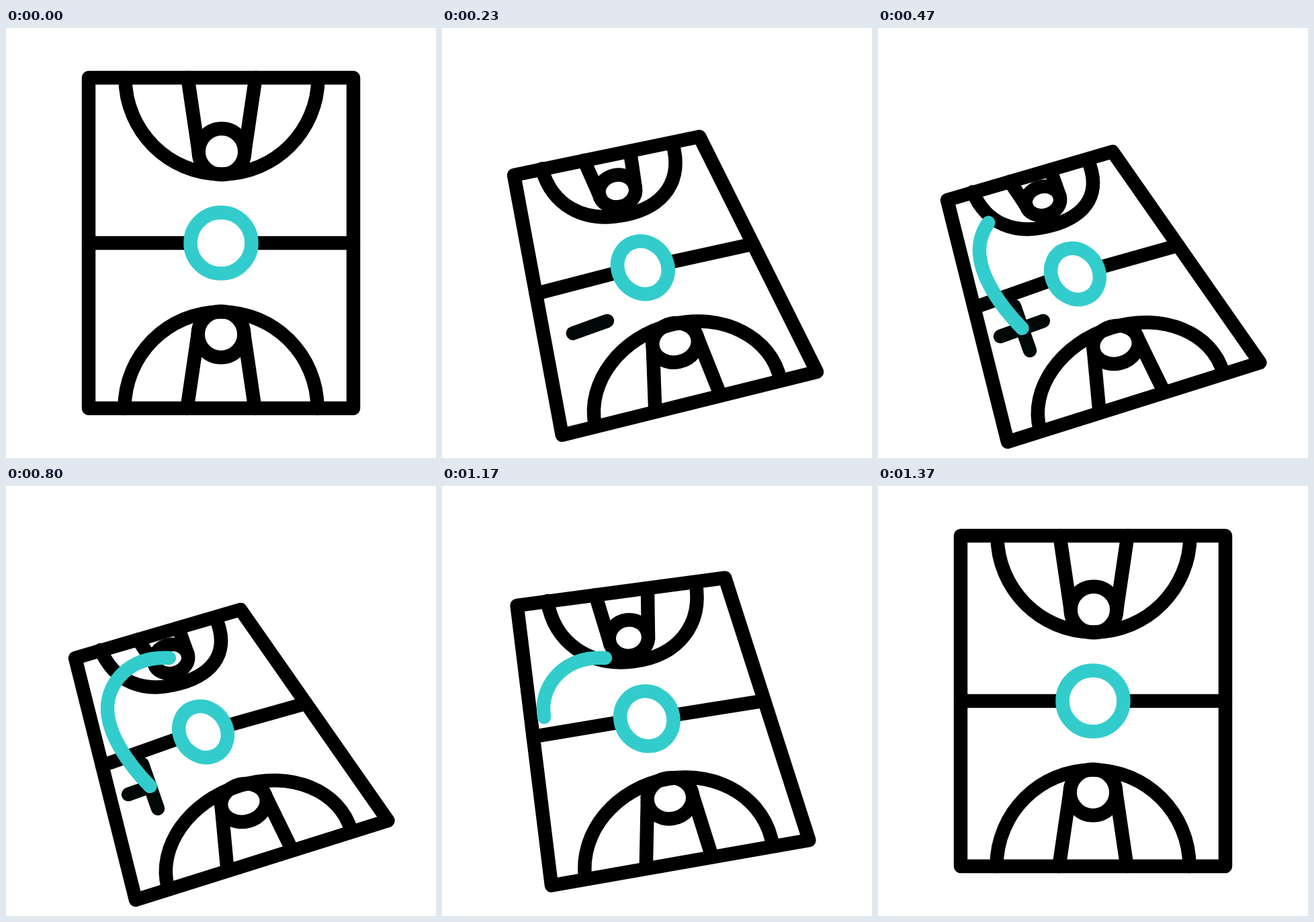
These frames come from a looping animation (640x640 px, 1670 ms). An HTML page with a canvas:

```html
<!DOCTYPE html>
<html lang="en">
<head>
<meta charset="utf-8">
<title>Court play</title>
<style>
html, body { margin: 0; width: 100%; height: 100%; overflow: hidden; background: #fff; }
canvas { display: block; width: 640px; height: 640px; }
</style>
</head>
<body>
<canvas id="stage" width="640" height="640"></canvas>
<script>
const ctx = document.getElementById('stage').getContext('2d');
const LOOP = 1670, FPS = 0.03, ROUND = 0.5523;
const BLACK = '#000', INK = '#010808', TEAL = '#33cccc';

const clamp = x => Math.min(1, Math.max(0, x));
const span = (f, from, to) => clamp((f - from) / (to - from));
const mix = (a, b, p) => a.map((v, i) => v + (b[i] - v) * p);

// Point at centre c, moved a times along u and b times along v
const at = (c, u, a, v = u, b = 0) => [c[0] + u[0] * a + v[0] * b, c[1] + u[1] * a + v[1] * b];

// Cubic timing curve with flat ends
function ease(x, x1, x2) {
  let lo = 0, hi = 1;
  for (let i = 0; i < 24; i++) {
    const u = (lo + hi) / 2, v = 1 - u;
    if (3 * u * v * v * x1 + 3 * u * u * v * x2 + u * u * u < x) lo = u; else hi = u;
  }
  return lo * lo * (3 - 2 * lo);
}

function line(...pts) {
  ctx.beginPath();
  pts.forEach(p => ctx.lineTo(...p));
  if (pts.length > 2) ctx.closePath();
  ctx.stroke();
}

// Half ellipse from c - u over c + v to c + u
function half(c, u, v, k = ROUND) {
  ctx.moveTo(...at(c, u, -1));
  ctx.bezierCurveTo(...at(c, u, -1, v, k), ...at(c, u, -k, v, 1), ...at(c, v, 1));
  ctx.bezierCurveTo(...at(c, u, k, v, 1), ...at(c, u, 1, v, k), ...at(c, u, 1));
}

function arc(c, u, v, k) {
  ctx.beginPath();
  half(c, u, v, k);
  ctx.stroke();
}

function oval(c, u, v) {
  ctx.beginPath();
  half(c, u, v);
  half(c, u, [-v[0], -v[1]]);
  ctx.stroke();
}

// A court end: border middle, arc half width and depth, hoop centre and axes, arc fullness
const flatEnd = (x, y, s) =>
  [x, y, 143.5, 0, 0, s * 143.5, x, y + s * 110, 34.3, 0, 0, 34.3, ROUND];
const ends = [
  [flatEnd(321, 74, 1), [226.5, 220, 85.5, -24, 32, 74, 245.5, 257.5, 25, -7, 6, 20.5, 0.64]],
  [flatEnd(320, 566, -1), [377.5, 556, 136.5, -42, -29.5, -110, 354, 471.5, 33, -9, 7.5, 27, ROUND]]
];
const border = [
  [123, 74, 517, 74, 517, 566, 123, 566],
  [103, 256, 349, 184, 568.5, 498, 193, 616]
];
const centre = [
  [320, 320, 45.5, 0, 0, 45.5],
  [293.5, 366, 34, -9, 13, 37]
];

const pairs = a => Array.from({ length: a.length >> 1 }, (_, i) => a.slice(2 * i, 2 * i + 2));

function drawEnd(pose) {
  const [mid, width, depth, hoop, u, v] = pairs(pose);
  arc(mid, width, depth, pose[12]);
  oval(hoop, u, v);
  for (const side of [-1, 1]) line(at(mid, width, side * 0.352), at(hoop, u, side));
}

function drawCourt(p) {
  const pose = ([a, b]) => mix(a, b, p);
  const [tl, tr, br, bl] = pairs(pose(border));
  const [c, u, v] = pairs(pose(centre));
  const half = 0.5 - 0.055 * p;

  ctx.strokeStyle = BLACK;
  line(tl, tr, br, bl);
  ends.forEach(e => drawEnd(pose(e)));
  line(mix(tl, bl, half), at(c, u, -1.05));
  line(at(c, u, 1.05), mix(tr, br, half));
  ctx.strokeStyle = TEAL;
  oval(c, u, v);
}

// Each mark draws itself in, then wipes out from its start
function mark(d, color, inAt, outAt) {
  const el = document.createElementNS('http://www.w3.org/2000/svg', 'path');
  el.setAttribute('d', d);
  return { path: new Path2D(d), len: el.getTotalLength(), color, inAt, outAt };
}

const marks = [
  mark('M246 436L182 459', INK, [3, 8], [21, 26]),
  mark('M203 414L226 480', INK, [8, 13], [25, 30]),
  mark('M214.5 447C180 412 151 368 151 331S182 253 243 256', TEAL, [8, 17], [30, 41])
];

function drawMark({ path, len, color, inAt, outAt }, f) {
  const from = span(f, ...outAt), to = span(f, ...inAt);
  if (to <= from) return;
  ctx.strokeStyle = color;
  ctx.setLineDash([len * (to - from), len * 2]);
  ctx.lineDashOffset = -len * from;
  ctx.stroke(path);
  ctx.setLineDash([]);
}

function draw(f) {
  ctx.fillStyle = '#fff';
  ctx.fillRect(0, 0, 640, 640);
  ctx.lineWidth = 20.5;
  ctx.lineCap = ctx.lineJoin = 'round';
  drawCourt(f < 31
    ? ease(span(f, 0, 10), 0.365, 0.63)
    : 1 - ease(span(f, 31, 41), 0.333, 0.51));
  marks.forEach(m => drawMark(m, f));
}

const start = performance.now();
function tick() {
  const t = Math.max(0, performance.now() - start) % LOOP;
  // 30 steps a second, on a 10 ms clock
  draw(Math.floor(Math.floor(t / 10) * 10 * FPS + 0.101));
  requestAnimationFrame(tick);
}
tick();
</script>
</body>
</html>
```
